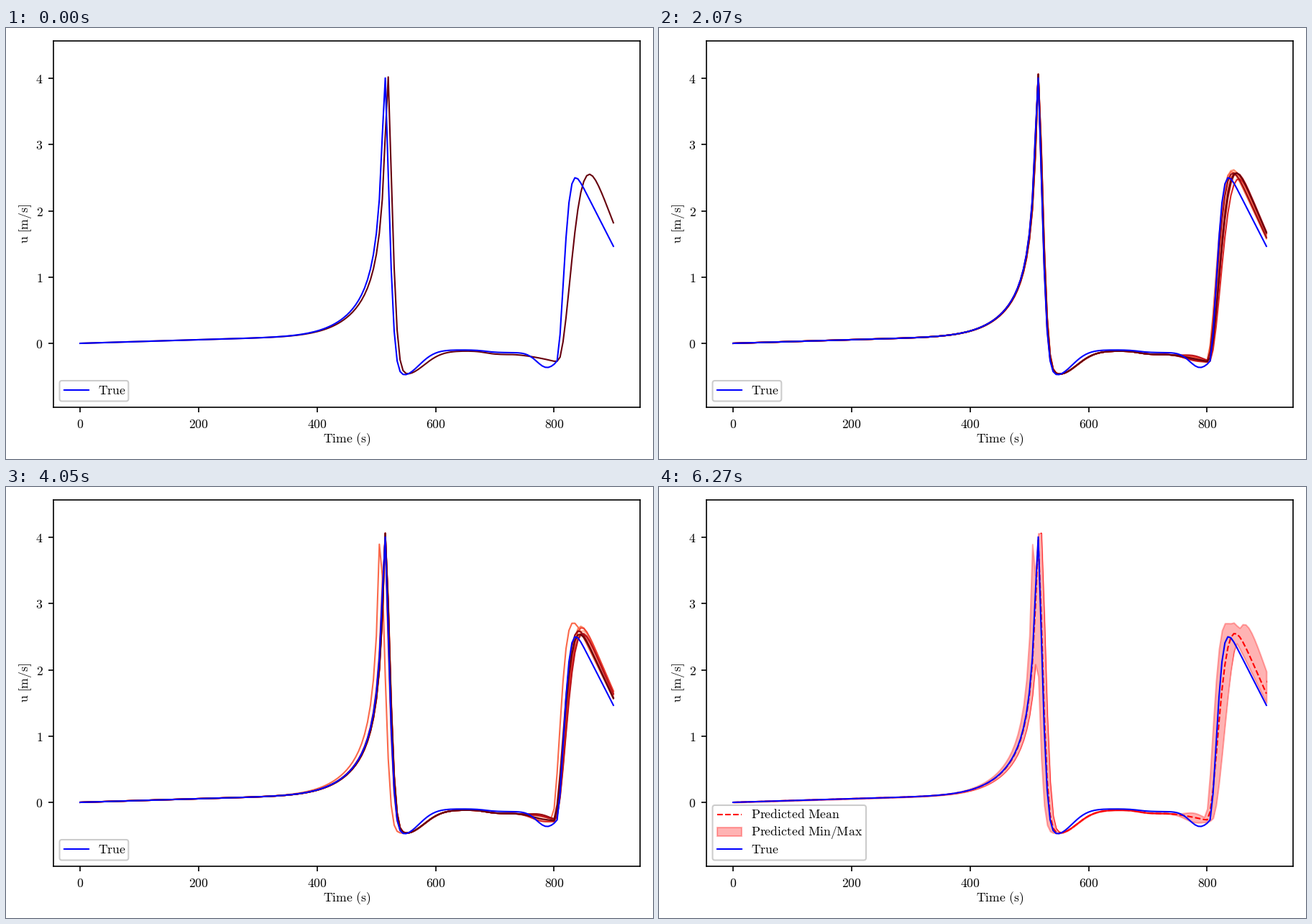
A matplotlib script for the animation above (6300 ms loop, 900 px wide and 600 px high).

```python
import numpy as np
import matplotlib.pyplot as plt
from matplotlib.animation import FuncAnimation
from matplotlib.patches import FancyBboxPatch, Rectangle

FRAMES, RUNS, TRAIL = 210, 150, 10
SIZE = 8.5
plt.rcParams["mathtext.fontset"] = "cm"
t = np.arange(0, 901, 5.0)


def roman(text):
    return r"$\mathrm{%s}$" % text.replace(" ", r"\ ")


def bell(x):
    return np.exp(-x ** 2)


def calm(level, depth, trough, spread, step):
    """Slow part: recovery from the trough, then a small step down."""
    return (level - depth * bell(np.maximum(t - trough, 0) / spread)
            - step / (1 + np.exp((685 - t) / 9)))


def signal(base, shift, start, width, end, slope):
    """Blow-up towards a spike, collapse onto base, then a late wave."""
    x = t - shift
    left = np.maximum(521 - x, 1)
    rise = .00027 * t + 33.3 / left * np.exp(-8.5e-5 * left ** 2)
    fall = base + 5.2 * bell(np.maximum(x - 509.5, 0) / 14.3)
    wave = 1 - bell(np.maximum(t - start, 0) / width)
    spike = np.minimum(np.minimum(rise, fall), 4.06)
    return spike + wave * (end + slope * (900 - t))


def predict(shift, late, gain, bump):
    sag = .1 * (np.clip(t - 730, 0, 70) / 70) ** 1.5
    base = calm(-.115, .35, 550, 43, .055) - sag + bump * bell((t - 778) / 22)
    return signal(base, shift, 806 + .75 * late, 33 + late,
                  gain * (2.09 + .02 * late), gain * (.0235 + .0004 * late))


true = signal(calm(-.1, .38, 545, 38, .04) - .225 * bell((t - 788) / 24),
              0, 804, 17, 1.605, .0175)

rng = np.random.default_rng(11)
shift = np.clip(rng.normal(.8, .9, RUNS), -1.2, 2.6)
late = np.clip(rng.normal(-7, 2.2, RUNS), -11, -2)
gain = rng.normal(.975, .012, RUNS)
bump = rng.normal(0, .028, RUNS)

# Now and then a run lags behind or comes early
x = np.linspace(0, 1, 5)
lag = np.round(x * (RUNS - 1)).astype(int)
shift[lag], late[lag] = 5 + .7 * x, 6 * x * (1 - x)
gain[lag], bump[lag] = 1 + .24 * x * (1 - x), 0
early = slice(42, None, 44)
shift[early], late[early], gain[early] = -7.2, -13.5, 1.01

runs = np.array([predict(*p) for p in zip(shift, late, gain, bump)])

fig = plt.figure(figsize=(6, 4), dpi=150, facecolor="white")
ax = fig.add_axes([66 / 900, 72 / 600, 816 / 900, 510 / 600])
ax.set(xlim=(-45, 945), ylim=(-.965, 4.564))
ax.set_xticks(range(0, 801, 200), [roman(str(v)) for v in range(0, 801, 200)])
ax.set_yticks(range(5), [roman(str(v)) for v in range(5)])
ax.tick_params(labelsize=SIZE)
fig.text(474 / 900, 1 - 573 / 600, roman("Time (s)"), size=SIZE,
         ha="center", va="center")
fig.text(27 / 900, 1 - 272 / 600, roman("u [m/s]"), size=SIZE,
         ha="center", va="center", rotation=90)

PINK, EDGE = (1, .7, .7), (1, 0, 0, .3)
under, = ax.plot(t, runs[-1], color="red", lw=1, zorder=.5)
band = ax.fill_between(t, runs.min(0), runs.max(0), facecolor=PINK,
                       edgecolor=EDGE, lw=1, zorder=1)
trail = [ax.plot(t, runs[0], lw=1, zorder=2)[0] for _ in range(TRAIL)]
mean, = ax.plot(t, runs.mean(0), "--", color="red", lw=1, zorder=3)
ax.plot(t, true, color="blue", lw=1, zorder=4)

# Legend layer in pixel coordinates
layer = fig.add_axes([0, 0, 1, 1])
layer.set(xlim=(0, 900), ylim=(600, 0))
layer.axis("off")


def box(right, top):
    return layer.add_patch(FancyBboxPatch(
        (74.5, top), right - 74.5, 519.5 - top, lw=1, ec=".8",
        fc=(1, 1, 1, .8), boxstyle="round,pad=0,rounding_size=3.3"))


def label(y, text):
    return layer.text(127.8, y + 5.5, roman(text), size=SIZE, va="baseline")


def key(y, style, color):
    return layer.plot([81.3, 114.6], [y, y], style, color=color, lw=1)[0]


small, large = box(170.3, 491), box(288, 443)
key(504, "-", "blue")
label(504, "True")
swatch = Rectangle((81.3, 473.8), 33.3, 11.7, fc=PINK, ec=EDGE, lw=1)
summary = [under, band, mean, large, layer.add_patch(swatch),
           key(455.5, "--", "red"), label(455.5, "Predicted Mean"),
           label(479.7, "Predicted Min/Max")]


def draw(f):
    done = f >= RUNS
    small.set_visible(not done)
    for artist in summary:
        artist.set_visible(done)
    under.set_alpha(np.clip((f - RUNS + 1) / (FRAMES - RUNS), 0, 1))
    for age, line in zip(range(TRAIL - 1, -1, -1), trail):
        k = f - age
        shown = 0 <= k < RUNS
        line.set_visible(shown)
        if shown:
            line.set_ydata(runs[k])
            line.set_color(plt.cm.Reds(1 - age / TRAIL))
    return trail


anim = FuncAnimation(fig, draw, frames=FRAMES, interval=30, repeat=True,
                     repeat_delay=0, blit=False)
plt.show()
```
